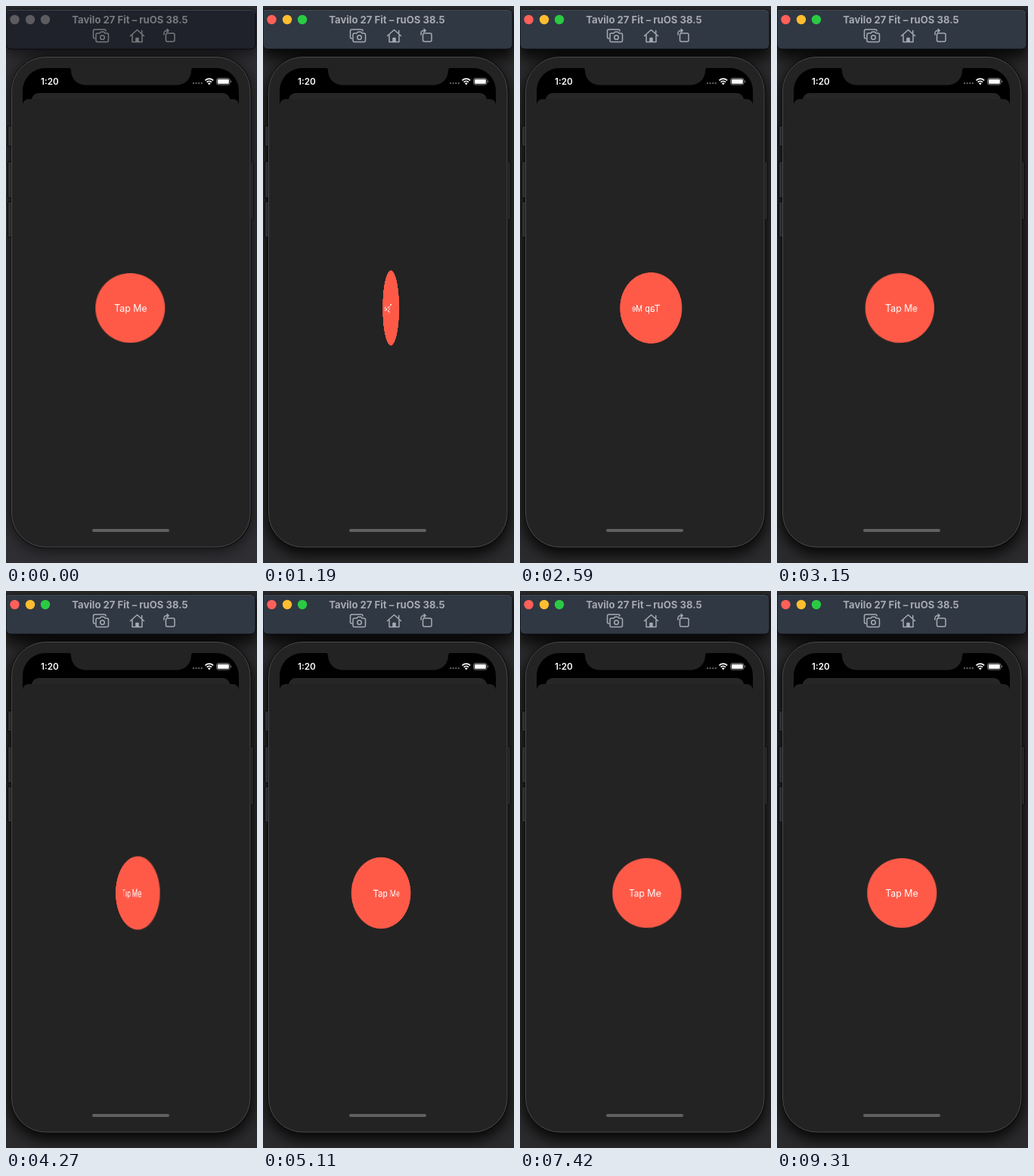
Animation of 332x736 px, one loop 9380 ms. Source, as an HTML page:

```html
<!DOCTYPE html>
<html lang="en">
<head>
<meta charset="utf-8">
<title>Spring button</title>
<style>
  html, body { margin: 0; width: 100%; height: 100%; overflow: hidden; background: #2b2b2d; }
  #stage { position: relative; width: 332px; height: 736px; overflow: hidden; }
  svg { position: absolute; inset: 0; display: block; }
  text { font-family: Inter, "Open Sans", sans-serif; }

  .desk { fill: #2f2f33; }
  .bar { fill: #1f222b; }
  .title { fill: #77797f; font-size: 13.1px; font-weight: 700; text-anchor: middle; }
  .icons { fill: none; stroke: #77787c; stroke-width: 1.5; stroke-linejoin: round; stroke-linecap: round; }
  .lights circle { fill: #5c5c60; }
  .shade { opacity: .55; }

  .active .desk { fill: #2b2b2d; }
  .active .bar { fill: #303843; }
  .active .title { fill: #a6a9b0; }
  .active .icons { stroke: #a6abb3; }
  .active .red { fill: #ff6059; }
  .active .yellow { fill: #ffbe2f; }
  .active .green { fill: #2aca44; }
  .active .shade { opacity: .8; transform: translateY(5px); }

  #button {
    position: absolute; left: 119px; top: 353px; width: 92px; height: 92px;
    border-radius: 50%; background: #ff5a48; color: #fff;
    font: 400 12.4px/94px Inter, "Open Sans", sans-serif;
    text-align: center; white-space: nowrap;
  }
</style>
</head>
<body>
<div id="stage">
  <svg width="332" height="736" viewBox="0 0 332 736">
    <defs>
      <filter id="soft" x="-20%" y="-20%" width="140%" height="140%"><feGaussianBlur stdDeviation="9"/></filter>
    </defs>
    <rect class="desk" width="332" height="736"/>
    <g class="shade" filter="url(#soft)">
      <rect x="0" y="6" width="330" height="58"/>
      <rect x="4" y="66" width="322" height="655" rx="50"/>
    </g>

    <!-- window bar -->
    <path class="bar" d="M0 5H324a6 6 0 0 1 6 6V51a6 6 0 0 1-6 6H6a6 6 0 0 1-6-6z" stroke="#08080a"/>
    <path d="M1 5.5H324a5.5 5.5 0 0 1 5 4" fill="none" stroke="#50545c" stroke-width=".8"/>
    <g class="lights">
      <circle class="red" cx="11.5" cy="18" r="6.2"/>
      <circle class="yellow" cx="32" cy="18" r="6.2"/>
      <circle class="green" cx="52" cy="18" r="6.2"/>
    </g>
    <text class="title" x="164" y="23">Tavilo 27 Fit – ruOS 38.5</text>
    <g class="icons">
      <path d="M117.5 43a2 2 0 0 1-2-2V33a2 2 0 0 1 2-2H130a2 2 0 0 1 2 2"/>
      <path d="M121 36h3l1.5-1.7h4L131 36h2.5a2 2 0 0 1 2 2v7.5a2 2 0 0 1-2 2H121a2 2 0 0 1-2-2V38a2 2 0 0 1 2-2z"/>
      <circle cx="127.5" cy="41.5" r="2.8"/>
      <path d="M164.5 39.5L173.5 31.5L182.5 39.5M167 38.5V47.5H180V38.5M179.7 32.5V36M172 47V42.5H175V47M173.5 43V47"/>
      <rect x="211.5" y="36" width="11.5" height="11" rx="2"/>
      <path d="M209 38V36a3.5 3.5 0 0 1 3.5-3.5H215M213 30.5L215.2 32.5L213 34.5"/>
    </g>

    <!-- phone body -->
    <g fill="#313133" stroke="#0b0b0c">
      <rect x="2.5" y="158.5" width="8" height="27" rx="1.5"/>
      <rect x="2.5" y="205.5" width="8" height="48" rx="1.5"/>
      <rect x="2.5" y="258.5" width="8" height="47" rx="1.5"/>
      <rect x="319" y="205.5" width="8" height="77" rx="1.5"/>
    </g>
    <rect x="6.5" y="66.5" width="318" height="650" rx="46" fill="#0b0b0c"/>
    <rect x="7.5" y="67.5" width="315.5" height="647.5" rx="45" fill="#232323" stroke="#49494b"/>

    <!-- screen top and stacked sheets -->
    <path d="M22 130V112a30 30 0 0 1 30-30H278a30 30 0 0 1 30 30V130z"/>
    <path d="M34 124a9 9 0 0 1 9-9H287a9 9 0 0 1 9 9z" fill="#262627"/>
    <path d="M22 131a8 8 0 0 1 8-8H300a8 8 0 0 1 8 8z" fill="#232323"/>
    <path d="M82 81.5a4 4 0 0 1 4 4a19 19 0 0 0 19 19H226a19 19 0 0 0 19-19a4 4 0 0 1 4-4z" fill="#232323"/>

    <!-- status line -->
    <text x="46" y="103.5" fill="#fff" font-size="11.7" font-weight="600">1:20</text>
    <g fill="#5a5a5c">
      <circle cx="248" cy="102" r="1.2"/><circle cx="251.6" cy="102" r="1.2"/>
      <circle cx="255.2" cy="102" r="1.2"/><circle cx="258.8" cy="102" r="1.2"/>
    </g>
    <path d="M263.5 98.4a7.5 7.5 0 0 1 10.6 0M265.6 100.7a4.6 4.6 0 0 1 6.4 0" fill="none" stroke="#fff" stroke-width="1.7"/>
    <path d="M266.9 102.2a2.8 2.8 0 0 1 3.8 0L268.8 104.2z" fill="#fff"/>
    <rect x="278.5" y="95.5" width="17.5" height="8.5" rx="2.5" fill="none" stroke="#777"/>
    <rect x="279.8" y="96.8" width="15" height="6" rx="1.3" fill="#fff"/>
    <path d="M297.2 98.3a1.6 1.6 0 0 1 0 3z" fill="#888"/>

    <rect x="114" y="691" width="102" height="4" rx="2" fill="#606060"/>
  </svg>
  <div id="button">Tap Me</div>
</div>
<script>
  const LOOP = 9380, STEP = 70;
  const ACTIVATE = 700, TAP = 803;
  const RATE = 20 / 21;           // playback runs slightly slow
  const EARLIER = 10.1;           // seconds since the previous tap
  const STIFFNESS = 5, DAMPING = 1;

  const stage = document.getElementById("stage");
  const button = document.getElementById("button");
  const decay = DAMPING / 2;
  const omega = Math.sqrt(STIFFNESS - decay * decay);

  // Remaining part of a unit move on an underdamped spring.
  function remaining(s) {
    return Math.exp(-decay * s) * (Math.cos(omega * s) + decay / omega * Math.sin(omega * s));
  }

  function angle(ms) {
    const s = ms / 1000 * RATE;
    let turns = -remaining(s + EARLIER);
    if (ms > TAP) turns += 1 - remaining(s - TAP / 1000 * RATE);
    return 360 * turns;
  }

  function draw(ms) {
    stage.classList.toggle("active", ms >= ACTIVATE);
    button.style.transform = `perspective(119px) rotateY(${angle(ms).toFixed(3)}deg)`;
  }

  const start = performance.now();
  function tick() {
    const ms = (performance.now() - start) % LOOP;
    draw(Math.floor(ms / STEP) * STEP);
    requestAnimationFrame(tick);
  }
  tick();
</script>
</body>
</html>
```
